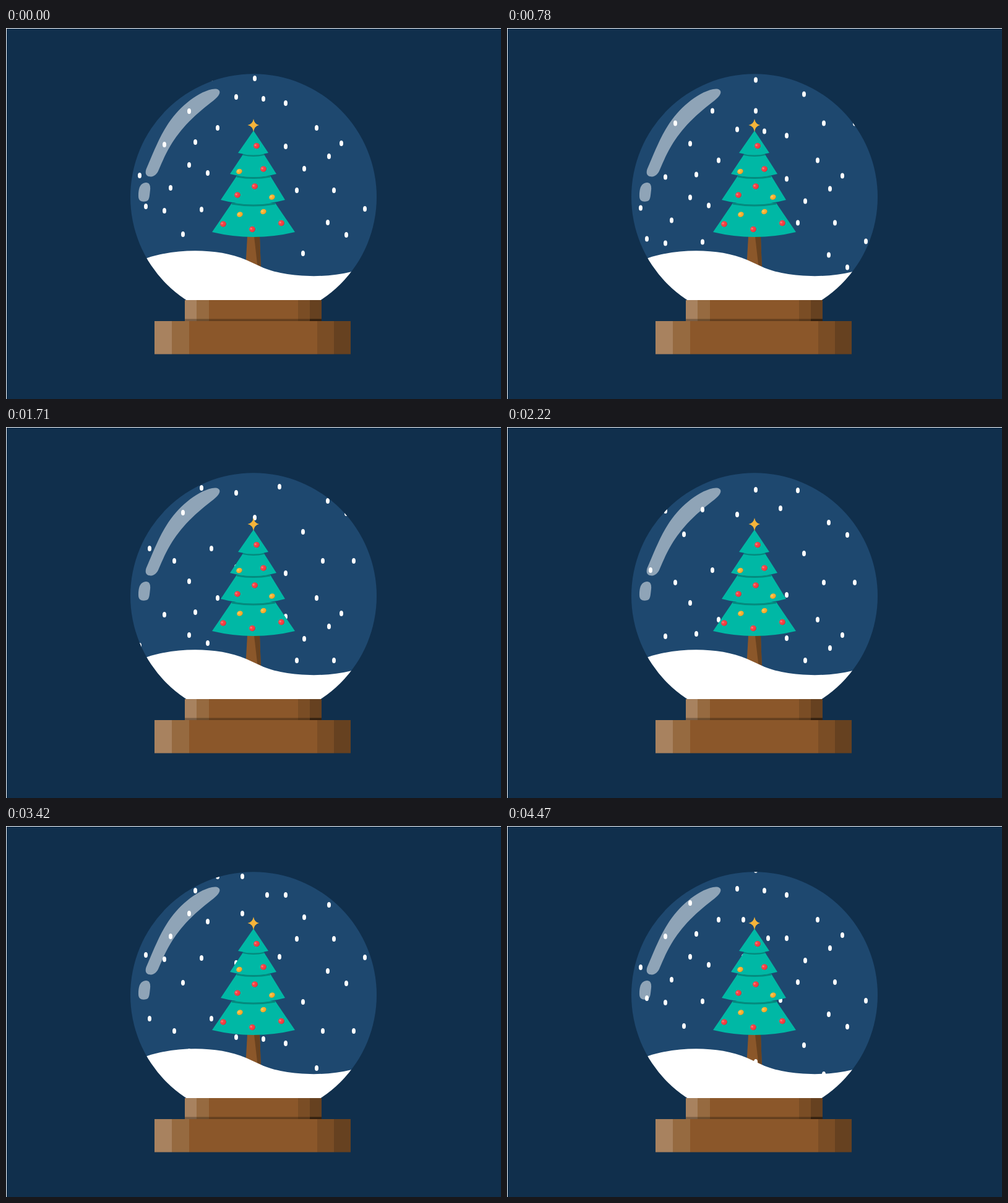
Animation, 800 px wide and 600 px high, one loop 4530 ms. Source, as an HTML page:

```html
<!DOCTYPE html>
<html lang="en">
<head>
<meta charset="utf-8">
<title>Snow globe</title>
<style>
  html, body { margin: 0; width: 100%; height: 100%; overflow: hidden; background: #fff; }
  svg { display: block; width: 800px; height: 600px; }
</style>
</head>
<body>
<svg viewBox="0 0 800 600">
  <defs>
    <clipPath id="glass"><path d="M0 0H800V440H0Z" clip-path="url(#ball)"/></clipPath>
    <clipPath id="ball"><circle cx="400" cy="273.3" r="199"/></clipPath>
    <radialGradient id="red" cx=".35" cy=".33" r=".75">
      <stop offset="0" stop-color="#ff8f8c"/><stop offset=".3" stop-color="#fb4348"/>
      <stop offset=".75" stop-color="#f13a3f"/><stop offset="1" stop-color="#c52a31"/>
    </radialGradient>
    <radialGradient id="gold" cx=".35" cy=".33" r=".75">
      <stop offset="0" stop-color="#ffd27a"/><stop offset=".3" stop-color="#fbb737"/>
      <stop offset=".75" stop-color="#f3aa2c"/><stop offset="1" stop-color="#c8851c"/>
    </radialGradient>
  </defs>

  <rect x="1" y="1" width="799" height="599" fill="#102f4c"/>

  <g clip-path="url(#glass)">
    <rect width="800" height="440" fill="#1e486f"/>
    <path d="M390 337H410L412 390H387Z" fill="#8b572a"/>
    <path d="M401 337H410L412 390H407Z" fill="#69421f"/>
    <path fill="#fff" fill-opacity=".5" d="M333 99C341 97 347 100 345 106C342 114 331 120 317 132C280 163 263 190 247 229C244 237 238 242 231 240C224 238 225 231 228 225C236 207 246 180 260 158C277 131 306 105 333 99ZM222 251C230 248 234 252 233 262C232 270 232 279 227 280C220 282 214 280 214 272C214 263 215 254 222 251Z"/>
    <g id="flakes" fill="#fff"></g>
    <path d="M200 382L228 372C276 356 344 356 388 375L412 386C443 401 508 407 559 394L600 380V440H200Z" fill="#fff"/>
  </g>

  <g fill="#00b8a5">
    <path d="M365 283H435L467 330Q400 346 333 330Z"/>
    <path d="M365 284Q400 290 435 284" class="shade"/>
    <path d="M373 239H427L451 278Q400 292 347 278Z"/>
    <path d="M373 240Q400 245 427 240" class="shade"/>
    <path d="M384 203H416L437 236Q400 246 362 236Z"/>
    <path d="M383 204.5Q400 208.5 417 204.5" class="shade"/>
    <path d="M400 166L424 202Q400 209 375 202Z"/>
  </g>
  <style>.shade { fill: none; stroke: #048a7e; stroke-width: 3; }</style>
  <path d="M400 147Q401.5 155.500 409 157Q401.500 158.500 400 168Q398.500 158.500 390.500 157Q398.500 155.500 400 147Z" fill="#f5b43a"/>
  <g id="baubles"></g>
  <g id="base"></g>
</svg>
<script>
const make = (parent, tag, attrs) => {
  const el = document.createElementNS('http://www.w3.org/2000/svg', tag);
  for (const key in attrs) el.setAttribute(key, attrs[key]);
  document.getElementById(parent).append(el);
};

// Snow: the main field is followed by a copy of itself, some flakes pass only once
const REPEAT = 310, STEP = 2.5, LOOP = 4530;
const field = [
  [402, 81], [372, 111], [416, 114], [452, 121], [296, 134], [342, 161], [502, 161],
  [306, 184], [542, 186], [256, 188], [452, 191], [522, 207], [296, 221], [482, 227],
  [326, 234], [216, 238], [266, 258], [470, 262], [530, 262], [226, 288], [580, 292],
  [316, 293], [256, 295], [520, 314], [286, 333], [550, 334], [480, 364]
];
const single = [
  [402, 31], [232, 81], [332, 81], [272, 101], [512, 101], [562, 101],
  [372, -9], [442, -19], [402, -49], [382, -89], [422, -119], [382, -149]
];
const copy = field.map(([x, y]) => [x, y - REPEAT]);
for (const [cx, y] of [...field, ...copy, ...single])
  make('flakes', 'ellipse', { cx, cy: y + 0.4, rx: 3, ry: 4.5 });

// Tree baubles
const bauble = (fill, ry) => ([x, y]) => make('baubles', 'ellipse', {
  rx: 4.9, ry, fill: `url(#${fill})`, transform: `translate(${x} ${y}) rotate(-20)`
});
[[405, 190.5], [416, 228], [402, 256], [374, 270], [351, 317], [398, 325.5], [445, 315.5]]
  .forEach(bauble('red', 4.8));
[[377, 232], [430, 273.5], [378, 301.5], [416, 297]].forEach(bauble('gold', 4.2));

// Wooden base
const wood = ['#a8825f', '#966a40', '#8b572a', '#7a4d25', '#664120'];
const plank = (y, height, edges) => wood.forEach((fill, i) =>
  make('base', 'rect', { x: edges[i], y, width: edges[i + 1] - edges[i], height, fill }));
plank(440, 34, [289, 308, 328, 472, 491, 510]);
make('base', 'rect', { x: 289, y: 470.5, width: 221, height: 3.5, fill: '#000', opacity: 0.28 });
make('base', 'rect', { x: 491, y: 470.5, width: 19, height: 3.5, fill: '#000', opacity: 0.3 });
plank(474, 53.5, [240, 268, 296, 503, 530, 557]);

// Four steps every 150 ms, the last one held twice as long
const flakes = document.getElementById('flakes');
function draw() {
  const t = performance.now() % LOOP;
  const step = 4 * Math.floor(t / 150) + Math.floor(t % 150 / 30);
  flakes.setAttribute('transform', `translate(0 ${Math.min(step, 120) * STEP})`);
  requestAnimationFrame(draw);
}
draw();
</script>
</body>
</html>
```
